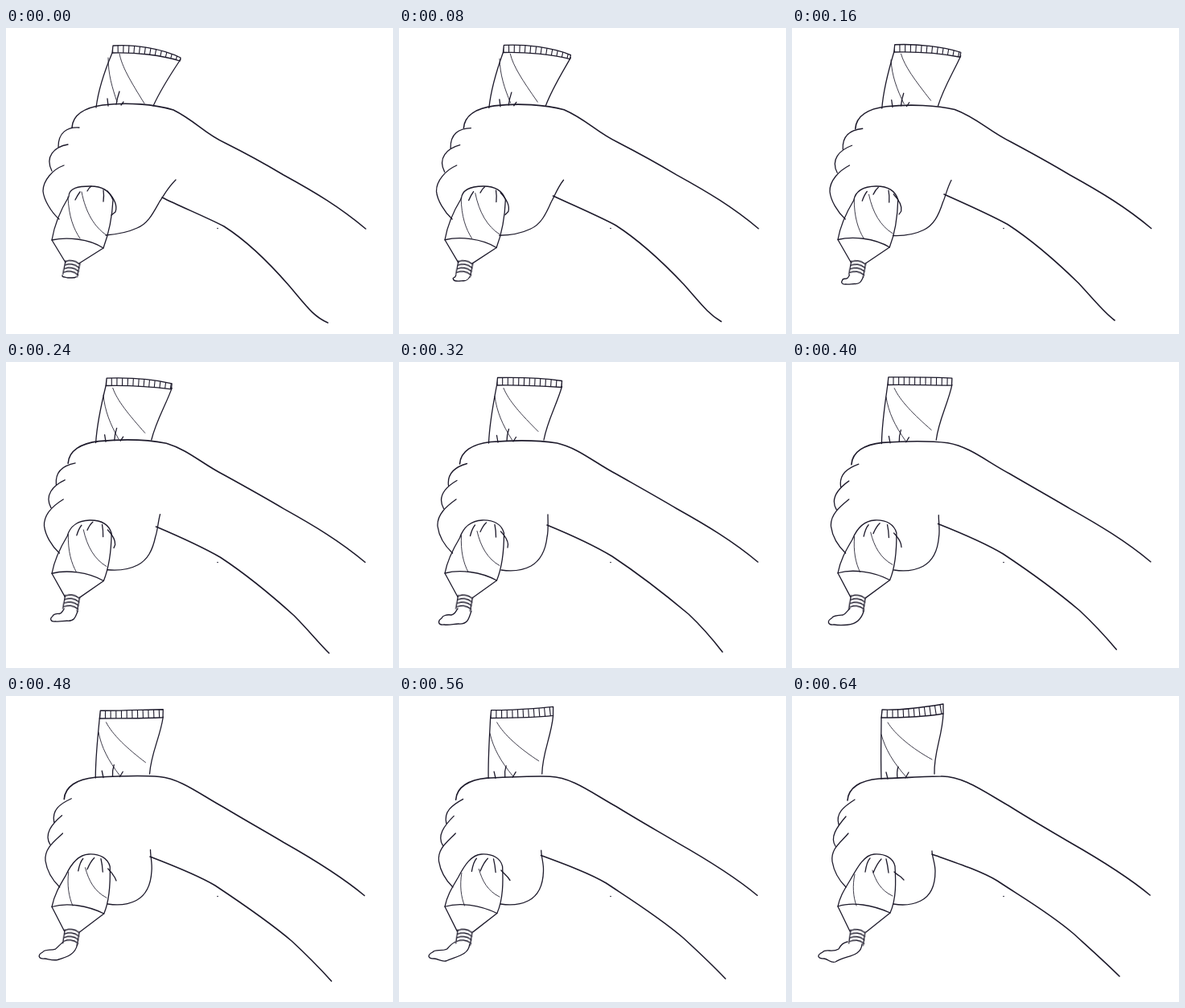
Write an HTML page without scripts that moves like this. It is 481 by 381 pixels and loops after 720 ms.

```html
<!DOCTYPE html>
<html lang="en">
<head>
<meta charset="utf-8">
<title>Squeezing a tube</title>
<style>
html, body { margin: 0; width: 100%; height: 100%; overflow: hidden; background: #fff; }
svg {
  display: block; width: 100%; height: 100%;
  fill: none; stroke: #1d1a2b; stroke-width: 1.3; stroke-linecap: round; stroke-linejoin: round;
}

/* Every line glides from pose --a to pose --b in nine drawings of 80 ms */
.line { animation: glide 720ms steps(9, jump-none) -1ms infinite; }
@keyframes glide {
  from { d: var(--a); }
  to { d: var(--b); }
}

/* Lines whose speed changes pass through --m at half way */
.bend { animation: bend 720ms steps(4) -1ms infinite; }
@keyframes bend {
  0% { d: var(--a); }
  44.44% { d: var(--m); }
  88.88%, 100% { d: var(--b); }
}

.neck { animation: tilt 720ms steps(9, jump-none) -1ms infinite; }
@keyframes tilt {
  from { transform: translate(83px, 291px) rotate(8deg); }
  to { transform: translate(82px, 292px) rotate(5deg); }
}

.bold { stroke-width: 1.6; }
.thin { stroke-width: .85; }
.teeth { stroke-width: 24; stroke-linecap: butt; stroke-dasharray: 1.1 5.6; }
</style>
</head>
<body>
<svg viewBox="0 0 481 381">
  <!-- arm and hand -->
  <g class="bold">
    <path class="line" style="
      --a: path('M82 124C83 108 98 99 120 96C150 92 185 95 208 102C236 116 246 131 272 143C300 157 325 171 345 183C385 205 415 223 447 250');
      --b: path('M69 130C70 114 85 105 108 103C140 102 165 100 185 100C212 99 240 120 270 137C300 156 325 170 345 182C380 202 415 223 445 248')"/>
    <path class="bend" style="
      --a: path('M194 211C216 222 250 236 271 247C304 268 332 298 352 321C374 347 382 359 400 367');
      --m: path('M184 203C218 217 245 230 265 242C304 268 335 293 360 314C378 331 392 348 402 361');
      --b: path('M174 197C205 208 235 218 255 230C285 250 320 270 350 296C372 316 390 332 407 349')"/>
  </g>
  <path class="bend" style="
    --a: path('M211 189C200 200 196 209 191 216C182 232 176 244 163 249C150 255 138 257 124 258');
    --m: path('M185 190C185 200 186 210 184 218C182 236 176 247 164 254C153 260 141 261 127 259');
    --b: path('M174 193C174 200 178 208 178 218C178 236 172 249 160 255C150 260 138 261 126 259')"/>
  <path class="line" style="
    --a: path('M91 124C76 123 65 130 65 148M77 145C60 148 48 160 57 178M72 171C58 176 46 190 46 203C47 214 56 229 66 238');
    --b: path('M78 129C64 138 54 146 58 160M67 150C55 164 47 176 54 187M70 171C60 183 48 190 50 206C52 218 57 228 67 238')"/>

  <!-- flat end of the tube -->
  <path class="line" style="
    --a: path('M132 31C124 50 115 75 112 99M217 39C205 57 193 75 183 97');
    --b: path('M111 27C111 50 110 75 111 103M188 22C187 50 176 70 177 97')"/>
  <g style="
    --a: path('M133 22C160 20 195 26 217 37L216 41C195 34 160 30 132 31Z');
    --b: path('M112 17C140 18 165 14 188 10L188 22C165 26 140 27 111 27Z')">
    <clipPath id="band"><path class="line"/></clipPath>
    <path class="line"/>
    <g clip-path="url(#band)">
      <path class="line teeth" style="--a: path('M132 27Q172 25 217 39'); --b: path('M111 22Q150 23 188 16')"/>
    </g>
  </g>
  <path class="line thin" style="
    --a: path('M127 37C127 58 132 74 138 92M141 32C144 48 154 65 172 94');
    --b: path('M111 48C116 66 125 82 143 102M119 33C128 48 150 66 174 79')"/>
  <path class="line" style="
    --a: path('M127 97L126 88M137 95Q138 88 141 79M143 96L146 92');
    --b: path('M119 103L117 95M131 102Q130 94 132 88M141 102L145 95')"/>

  <!-- nozzle end of the tube -->
  <path class="line" style="
    --a: path('M57 264C60 246 67 228 78 210C78 199 90 197 105 197C120 197 129 203 133 214C132 235 128 255 121 274');
    --b: path('M57 262C60 248 66 240 73 228C82 212 90 198 102 197C116 196 126 202 128 212C129 230 130 252 122 270')"/>
  <path class="line" style="
    --a: path('M126 203Q140 218 136 229L131 233');
    --b: path('M127 219Q130 222 135 225L139 229')"/>
  <path class="line" style="
    --a: path('M74 292L57 264C75 260 103 262 121 274L91 293');
    --b: path('M72 293L57 262C75 256 100 260 122 270L92 294')"/>
  <path class="line thin" style="
    --a: path('M77 210C78 235 84 250 92 262M94 204C99 230 110 248 125 258');
    --b: path('M78 222C75 236 76 250 80 261M100 217C104 230 110 242 125 249')"/>
  <path class="line" style="
    --a: path('M86 214Q89 208 92 204M101 203Q103 199 106 197M121 202Q122 208 121 216');
    --b: path('M91 219Q93 206 97 202M101 220Q106 208 111 203M117 203Q119 211 120 220')"/>
  <g class="neck">
    <path d="M-9 0L-10 17M9 1L8 18"/>
    <path id="ring" d="M-9 1Q0-4 9 2"/>
    <use href="#ring" y="4.500"/>
    <use href="#ring" y="9"/>
    <use href="#ring" y="13.500"/>
  </g>

  <!-- paste -->
  <path class="bend" style="
    --a: path('M70 308C70 309 70 309 70 309C71 310 71 310 72 310C74 310 75 311 77 311C79 311 81 311 82 311C84 311 86 311 87 310');
    --m: path('M73 307C70 311 70 314 65 315C59 314 54 316 53 319C48 322 48 328 56 327C63 328 68 326 74 326C87 327 87 317 90 310');
    --b: path('M69 306C64 307 60 311 58 315C50 320 42 314 38 319C30 323 32 327 40 327C46 328 48 333 54 331C66 323 86 325 87 309')"/>
  <circle cx="263" cy="249.500" r=".8" fill="#1d1a2b" stroke="none"/>
</svg>
</body>
</html>
```
